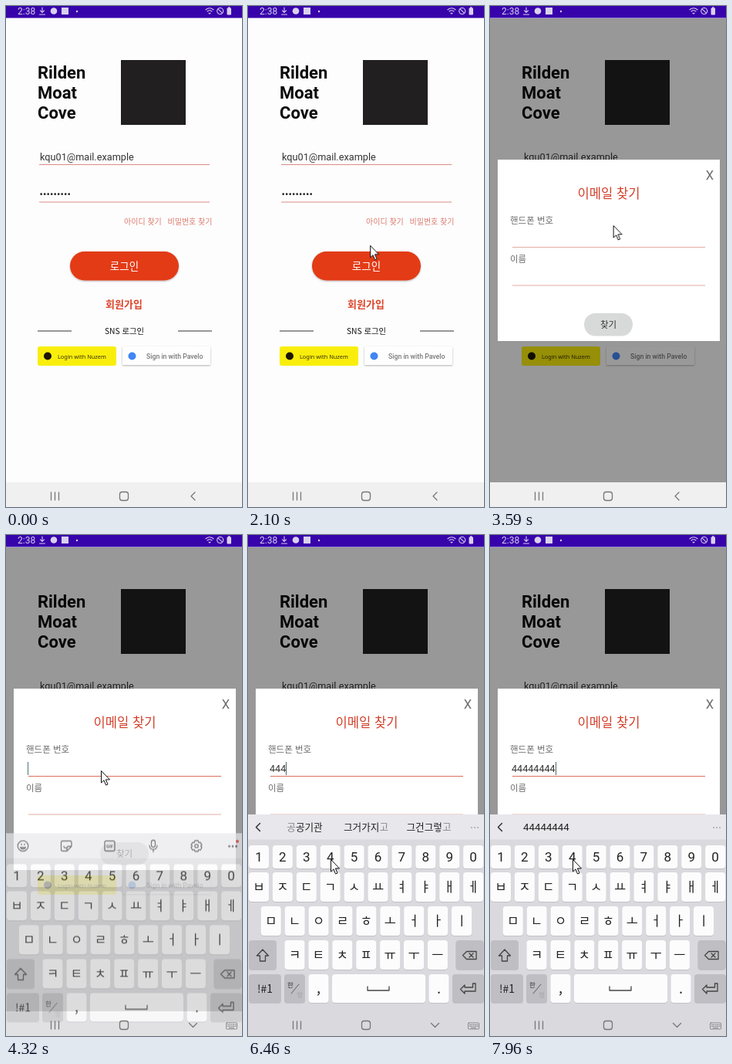
An HTML page that plays this animation: 306 by 649 pixels, repeating every 8000 ms.

```html
<!DOCTYPE html>
<html lang="ko">
<head>
<meta charset="utf-8">
<title>Login</title>
<style>
html, body { margin: 0; width: 100%; height: 100%; overflow: hidden; background: #fdfdfe; }
svg { position: absolute; left: 0; top: 0; display: block; }
text, span { font-family: Roboto, "Noto Sans CJK KR", "Noto Sans CJK", sans-serif; }
.ko { font-family: "Noto Sans CJK KR", "Noto Sans CJK", sans-serif; }
.mid { text-anchor: middle; }
.line { fill: none; stroke-linecap: round; stroke-linejoin: round; }

#dim, #dialog, #keyboard, #cursor { animation: 8s linear infinite; }
#dim { animation-name: dim; }
#dialog { animation-name: dialog; transform-origin: 154px 316.5px; }
#keyboard { animation-name: keyboard; }
#cursor { animation-name: cursor; }
.focus { animation: focus 8s step-end infinite; }
.navBack { animation: hideAtKeys 8s step-end infinite; }
.navDown { animation: showAtKeys 8s step-end infinite; }
#tools { animation: tools 8s step-end infinite; }
#bar { animation: bar 8s step-end infinite; }
#words { animation: words 8s step-end infinite; }

.typed { position: absolute; overflow: hidden; white-space: nowrap; box-sizing: content-box; }
#field { left: 28px; top: 293.5px; font-size: 12.6px; line-height: 17px; color: #333;
  border-right: 1.3px solid; animation: typed 8s step-end infinite, caret 8s step-end infinite; }
#hint { left: 43px; top: 370px; font-size: 13.3px; line-height: 17px; color: #222;
  animation: typed 8s step-end infinite, hint 8s step-end infinite; }

@keyframes dim {
  0%, 33.5% { opacity: 0; height: 591px; }
  35.25% { opacity: .33; height: 591px; }
  36.2% { height: 591px; }
  36.21% { height: 601px; }
  37%, 100% { opacity: .4; height: 601px; }
}
@keyframes dialog {
  0%, 33.75% { opacity: 0; transform: translateY(-8px) scale(.965, .955); }
  35.25% { opacity: .83; transform: translateY(-5px) scale(.986, .977); }
  37%, 100% { opacity: 1; transform: none; }
}
@keyframes keyboard {
  0%, 52.8% { opacity: 0; transform: translateY(46px); }
  54% { opacity: .68; transform: translateY(24.5px); }
  55.9%, 100% { opacity: 1; transform: none; }
}
@keyframes cursor {
  0%, 7.59% { opacity: 0; transform: translate(262px, 603px); }
  7.6% { opacity: 1; transform: translate(262px, 603px); animation-timing-function: ease-out; }
  12.6%, 24.2% { transform: translate(146px, 336px); }
  26.25% { transform: translate(158px, 310px); }
  28.25%, 42.9% { transform: translate(170px, 278px); animation-timing-function: ease-in-out; }
  49%, 57.9% { transform: translate(123px, 305px); animation-timing-function: ease-in-out; }
  66.75%, 100% { opacity: 1; transform: translate(107px, 420px); }
}
@keyframes focus { 0% { stroke: #e3aca3; } 51.25%, 100% { stroke: #d9705c; } }
@keyframes hideAtKeys { 0% { opacity: 1; } 52.9%, 100% { opacity: 0; } }
@keyframes showAtKeys { 0% { opacity: 0; } 52.9%, 100% { opacity: 1; } }
@keyframes tools { 0% { opacity: 1; } 73%, 100% { opacity: 0; } }
@keyframes bar { 0% { opacity: 0; } 73%, 100% { opacity: 1; } }
@keyframes words { 0% { opacity: 1; } 91.6%, 100% { opacity: 0; } }
@keyframes hint { 0% { opacity: 0; } 91.6%, 100% { opacity: 1; } }
@keyframes typed {
  0% { width: 0; } 73% { width: 1ch; } 76% { width: 2ch; } 79% { width: 3ch; }
  82% { width: 4ch; } 85% { width: 5ch; } 88% { width: 6ch; } 91.6% { width: 7ch; }
  95.5%, 100% { width: 8ch; }
}
@keyframes caret {
  0% { border-color: transparent; } 51.25% { border-color: #4d7478; }
  57.5% { border-color: transparent; } 63.75% { border-color: #4d7478; }
  70% { border-color: transparent; } 73%, 100% { border-color: #4d6468; }
}
</style>
</head>
<body>
<svg width="306" height="649" viewBox="0 0 306 649">
  <defs>
    <filter id="soft" x="-10%" y="-20%" width="120%" height="150%">
      <feDropShadow dx="0" dy="1" stdDeviation="1" flood-color="#000" flood-opacity=".3"/>
    </filter>
  </defs>

  <!-- login page -->
  <rect width="306" height="649" fill="#fdfdfe"/>
  <g font-size="22" font-weight="700" fill="#0c0c0c">
    <text x="41" y="94">Rilden</text>
    <text x="41" y="120">Moat</text>
    <text x="41" y="146">Cove</text>
  </g>
  <rect x="149" y="70" width="84" height="84" fill="#221f20"/>
  <text x="44" y="200" font-size="12.7" fill="#333">kqu01@mail.example</text>
  <g id="dots" fill="#222"></g>
  <path d="M43 205.5H264M43 254H264" stroke="#dc8d83"/>
  <g class="ko" font-size="10" fill="#dc7869">
    <text class="ko" x="153" y="283">아이디 찾기</text>
    <text class="ko" x="209.5" y="283">비밀번호 찾기</text>
  </g>
  <rect x="83" y="318" width="141" height="37.5" rx="18.7" fill="#e33a17" filter="url(#soft)"/>
  <text class="ko mid" x="153.5" y="342" font-size="13.5" font-weight="500" fill="#fff">로그인</text>
  <text class="ko mid" x="153" y="390.5" font-size="13" font-weight="700" fill="#dc4429">회원가입</text>
  <text class="ko mid" x="153.5" y="425" font-size="10.3" font-weight="500" fill="#111">SNS 로그인</text>
  <path d="M41 421H85M223 421H267" stroke="#333"/>
  <rect x="41" y="441" width="102" height="25" rx="3" fill="#f9ee0b"/>
  <circle cx="54" cy="453.5" r="5" fill="#1c1500"/>
  <text x="67" y="456.5" font-size="7.4" fill="#3a3000" style="font-family:'Noto Sans',sans-serif">Login with Nuzem</text>
  <rect x="151" y="441" width="114" height="24" rx="1" fill="#fefefe" filter="url(#soft)"/>
  <circle cx="163.5" cy="453.5" r="5" fill="#4285f4"/>
  <text x="182" y="456.5" font-size="8.7" font-weight="500" fill="#777">Sign in with Pavelo</text>

  <rect y="617" width="306" height="32" fill="#f0f0f0"/>
  <rect id="dim" y="16" width="306" height="591" fill="#000"/>

  <!-- status bar -->
  <rect width="306" height="15.5" fill="#3703aa"/>
  <g fill="#d9d0ee">
    <text x="15" y="11" font-size="12">2:38</text>
    <circle cx="62" cy="6.5" r="4.3"/>
    <rect x="72" y="2" width="9" height="9"/>
    <circle cx="92" cy="7" r="1.2"/>
    <rect x="286.5" y="2.5" width="5.5" height="9" rx="1"/>
    <rect x="288" y="1.3" width="2.5" height="2"/>
  </g>
  <g class="line" stroke="#d9d0ee" stroke-width="1.1">
    <path d="M47 2V8M44.5 5.8L47 8.3L49.5 5.8M43.5 11H50.5"/>
    <path d="M259 4.8Q264 .8 269 4.8M261 7Q264 4.6 267 7M263 9.2L264 10L265 9.2"/>
    <circle cx="277.7" cy="6.5" r="4"/>
    <path d="M275 3.8L280.4 9.2"/>
  </g>

  <!-- find e-mail dialog -->
  <g id="dialog">
    <rect x="10" y="199" width="288" height="235" fill="#fff"/>
    <text class="mid" x="285" y="225" font-size="16.5" fill="#6c6c6c">X</text>
    <text class="ko mid" x="154" y="248.5" font-size="16.6" font-weight="500" fill="#d2402a">이메일 찾기</text>
    <text class="ko" x="26" y="282" font-size="11.5" fill="#6d6d6d">핸드폰 번호</text>
    <path class="focus" d="M29 312.5H279"/>
    <text class="ko" x="26" y="331.5" font-size="11.5" fill="#6d6d6d">이름</text>
    <path d="M29 362H279" stroke="#e3aca3"/>
    <rect x="122" y="398" width="63" height="29.5" rx="14.7" fill="#d8d9d9"/>
    <text class="ko mid" x="153.5" y="416.5" font-size="11.5" fill="#333">찾기</text>
  </g>

  <!-- keyboard -->
  <g id="keyboard">
    <rect y="362" width="306" height="290" fill="#dad9de"/>
    <rect y="362" width="306" height="32.5" fill="#e8e7ec"/>
    <g id="tools">
      <g class="line" stroke="#444" stroke-width="1.3">
        <circle cx="22" cy="378.5" r="6.8"/>
        <path d="M18.5 380.5Q22 384.5 25.5 380.5Z"/>
        <path d="M73.500 372H83Q85 372 85 374V379L79 385H73.500Q71.500 385 71.500 383V374Q71.500 372 73.500 372ZM85 379H81Q79 379 79 381V385M75 379Q75.500 381.500 78 381"/>
        <rect x="128" y="372" width="13" height="13" rx="2"/>
        <rect x="188.500" y="371" width="5" height="9" rx="2.500"/>
        <path d="M186 378Q186.500 383 191 383T196 378M191 383V386"/>
        <circle cx="247" cy="378.500" r="2.200"/>
        <path d="M245 371.500H249L249.800 374L252 373.800L254 377.200L252.500 378.500L254 380.500L252 383.800L249.800 383.200L249 385.500H245L244.200 383.200L242 383.800L240 380.500L241.500 378.500L240 377.200L242 373.800L244.200 374Z"/>
      </g>
      <g fill="#444">
        <circle cx="20" cy="376.500" r=".9"/><circle cx="24" cy="376.500" r=".9"/>
        <text class="mid" x="134.500" y="380.700" font-size="5.800" font-weight="700">GIF</text>
        <circle cx="289.500" cy="379" r="1.400"/><circle cx="294" cy="379" r="1.400"/><circle cx="298.500" cy="379" r="1.400"/>
      </g>
      <circle cx="300" cy="372.500" r="2" fill="#d8392b"/>
    </g>
    <g id="bar">
      <path class="line" d="M15.500 373.500L10.500 378.500L15.500 383.500" stroke="#333" stroke-width="1.500"/>
      <g fill="#aaa"><circle cx="290" cy="379" r="1"/><circle cx="294" cy="379" r="1"/><circle cx="298" cy="379" r="1"/></g>
      <g id="words" font-size="12.600" fill="#222">
        <text class="ko mid" x="73.500" y="383"><tspan fill="#888">공</tspan>공기관</text>
        <text class="ko mid" x="153" y="383">그거가지<tspan fill="#888">고</tspan></text>
        <text class="ko mid" x="234.500" y="383">그건그렇<tspan fill="#888">고</tspan></text>
      </g>
    </g>
    <g id="keys"></g>
    <g class="line" stroke="#444" stroke-width="1.300">
      <path d="M19 537L26.500 545H22.500V552H15.500V545H11.500Z"/>
      <path d="M283.500 539.500H296V549.500H283.500L278.500 544.500ZM287 542L292 547M292 542L287 547"/>
      <path d="M155 585V590H183V585"/>
      <path d="M281 583L275.500 588.500L281 594V591H295V581H291.500V586H281Z"/>
      <path d="M56 594L66 582" stroke-width=".8"/>
    </g>
    <text class="ko mid" x="55" y="586" font-size="8.500" fill="#333">한</text>
    <text class="ko mid" x="67" y="599" font-size="8.500" fill="#a5a5a8">영</text>
  </g>

  <!-- navigation -->
  <g class="line" stroke="#777" stroke-width="1.300">
    <path d="M58.500 630V640M63.500 630V640M68.500 630V640"/>
    <rect x="147.500" y="629.500" width="11" height="11" rx="3"/>
    <path class="navBack" d="M245 630L240 635L245 640"/>
    <g class="navDown">
      <path d="M237.500 632.500L242.500 637.500L247.500 632.500"/>
      <rect x="285.500" y="632" width="14" height="8" rx="1" stroke-width=".8"/>
      <path d="M287.500 634.500H298M287.500 636.500H298" stroke-dasharray=".8 1.600" stroke-width="1"/>
      <path d="M289.500 638.500H295.500" stroke-width=".8"/>
    </g>
  </g>
</svg>

<span class="typed" id="field">44444444</span>
<span class="typed" id="hint">44444444</span>

<svg width="306" height="649" viewBox="0 0 306 649">
  <path id="cursor" d="M.5 .5V16L4 12.800L6.500 19L9 18L6.400 11.900H11.500Z" fill="#fff" stroke="#111"/>
</svg>

<script>
const $ = id => document.getElementById(id);
const PITCH = 30.9;

function key(cx, y, w, h, label, size, fill = '#fcfcfd') {
  const x = cx - w / 2;
  return `<rect x="${x}" y="${y + 1}" width="${w}" height="${h}" rx="4" fill="#c2c1c7"/>` +
    `<rect x="${x}" y="${y}" width="${w}" height="${h}" rx="4" fill="${fill}"/>` +
    `<text class="ko mid" x="${cx}" y="${y + h / 2 + size * 0.37}" font-size="${size}" fill="#222">${label}</text>`;
}

function row(labels, first, y, h) {
  return [...labels].map((c, i) => {
    const cx = first + i * PITCH;
    if (h > 32) return key(cx, y, 26, h, c, 16.5);
    return key(cx, y, 26, h, c, 17).replace('class="ko mid"', 'class="mid"');
  }).join('');
}

const GREY = '#bfbec3';
$('keys').innerHTML =
  row('1234567890', 14, 402, 30) +
  row('ㅂㅈㄷㄱㅅㅛㅕㅑㅐㅔ', 14, 437, 38) +
  row('ㅁㄴㅇㄹㅎㅗㅓㅏㅣ', 29.8, 481, 38) +
  row('ㅋㅌㅊㅍㅠㅜㅡ', 60.5, 525, 38) +
  key(19, 525, 36, 38, '', 14, GREY) +
  key(287.5, 525, 36, 38, '', 14, GREY) +
  key(22, 569, 42, 37, '!#1', 14, GREY) +
  key(60.5, 569, 27, 37, '', 14, GREY) +
  key(91.5, 569, 26, 37, ',', 18) +
  key(169.5, 569, 121, 37, '', 14) +
  key(247.5, 569, 26, 37, '.', 18) +
  key(285.5, 569, 41, 37, '', 14, GREY);

$('dots').innerHTML = Array.from({ length: 9 }, (_, i) =>
  `<circle cx="${45.7 + i * 4.5}" cy="243.7" r="1.35"/>`).join('');
</script>
</body>
</html>
```
